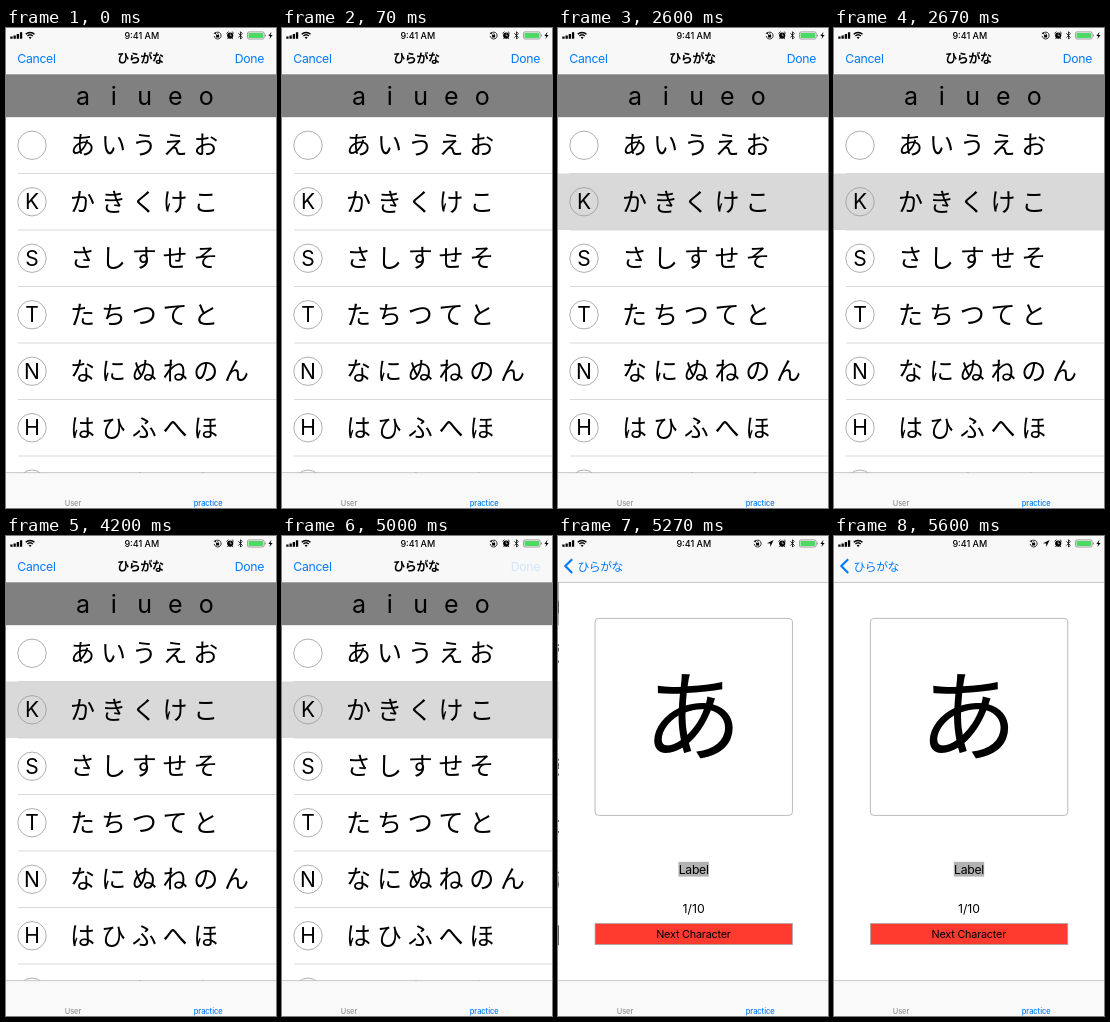
Write an HTML page that moves like this. It is 270x480 px and loops after 8 s.

```html
<!DOCTYPE html>
<html lang="ja">
<head>
<meta charset="utf-8">
<title>ひらがな</title>
<style>
html, body { margin: 0; width: 100%; height: 100%; overflow: hidden; background: #fff; }
svg { display: block; width: 100vw; height: 100vh; }
text { font-family: Inter, "Liberation Sans", sans-serif; fill: #000; }
.jp { font-family: "Noto Sans CJK JP", "Noto Sans CJK", sans-serif; font-weight: 350; }
.mid { text-anchor: middle; }
.ui { font-size: 12.24px; letter-spacing: -.3px; }
.blue { fill: #007aff; }
.kana { font-size: 25px; }
.line { fill: none; stroke: #000; stroke-width: .8; stroke-linecap: round; stroke-linejoin: round; }
</style>
</head>
<body>
<svg id="stage" viewBox="0 0 270 480">
  <rect width="270" height="480" fill="#fff"/>

  <g id="list">
    <rect y="46" width="270" height="43.2" fill="#808080"/>
    <g id="vowels"></g>
    <rect id="mark" width="270" height="56.5" fill="#d9d9d9"/>
    <g id="rows"></g>
  </g>

  <g id="card">
    <rect width="270" height="480" fill="#fff"/>
    <rect x="36.4" y="82.4" width="197.4" height="197" rx="3.5" fill="#fff" stroke="#aaa" stroke-width=".8"/>
    <text class="jp mid" x="134.2" y="217.4" font-size="98.5">あ</text>
    <rect x="119.8" y="325.8" width="30.4" height="14.8" fill="#b2b2b2"/>
    <text class="ui mid" x="135" y="337.7">Label</text>
    <text class="mid" x="135" y="377" font-size="12.24">1/10</text>
    <rect x="36.4" y="387.4" width="197.4" height="21.2" fill="#ff3b30" stroke="#aaa" stroke-width=".8"/>
    <text class="mid" x="134.8" y="402" font-size="10.8" letter-spacing="-.2">Next Character</text>
  </g>

  <rect width="270" height="46" fill="#f8f8f8"/>
  <rect y="46" width="270" height=".7" fill="#b2b2b2"/>
  <g id="listNav">
    <text class="ui blue" x="11.3" y="34.5">Cancel</text>
    <text class="jp mid" x="134.4" y="34.6" font-size="12" style="font-weight:600" letter-spacing="-.4">ひらがな</text>
    <text id="done" class="ui blue" x="228.8" y="34.5">Done</text>
  </g>
  <g id="cardNav">
    <path d="M14.2 23.2L7.3 30.1L14.2 37" fill="none" stroke="#007aff" stroke-width="2.1"/>
    <text class="jp blue" x="19.4" y="34.6" font-size="11.9" letter-spacing="-.5">ひらがな</text>
  </g>

  <rect y="444.8" width="270" height="35.2" fill="#f9f9f9"/>
  <rect y="444.4" width="270" height=".7" fill="#b2b2b2"/>
  <text class="mid" x="67" y="477.6" font-size="7.4" font-weight="500" style="fill:#929292">User</text>
  <text class="mid blue" x="202.2" y="477.6" font-size="7.4" font-weight="500">practice</text>

  <g id="status">
    <path d="M4.3 8.6h2.3v2.2h-2.3zM7.5 7.4h2.3v3.4h-2.3zM10.7 5.9h2.3v4.9h-2.3zM13.9 4.2h2.3v6.6h-2.3z"/>
    <path class="line" style="stroke-width:1.4;stroke-linecap:butt" d="M19.7 6.3a6.2 6.2 0 0 1 8.8 0M21.4 8.1a3.9 3.9 0 0 1 5.4 0"/>
    <path d="M22.7 9.4a2 2 0 0 1 2.8 0L24.1 10.9z"/>
    <text class="mid" x="135.8" y="10.6" font-size="9" font-weight="500">9:41 AM</text>
    <g id="lock">
      <path class="line" d="M-2.5 -2.4A3.5 3.5 0 1 1 -3.4 .8"/>
      <path d="M-4.1 -2.6l2.5 -.7l-.3 2.3zM-1.5 -.4h3v2.3h-3z"/>
      <path class="line" style="stroke-width:.6" d="M-.9 -.4v-.6a.9 .9 0 0 1 1.8 0v.6"/>
    </g>
    <path id="arrow" d="M215.6 4L209 7.3L212.1 7.6L212.4 10.8z"/>
    <circle cx="224.2" cy="7.6" r="3.1"/>
    <path class="line" d="M220.8 5.2l1.4 -1.3M227.6 5.2l-1.4 -1.3M222.3 10l-.7 .8M226.1 10l.7 .8"/>
    <path class="line" style="stroke:#fff;stroke-width:.6" d="M224.2 5.9v1.8h1.2"/>
    <path class="line" d="M232.6 5.5L236.3 9.3L234.5 11.1V3.7L236.3 5.5L232.6 9.3"/>
    <rect x="241.5" y="3.9" width="16.6" height="7.1" rx="1.5" fill="none" stroke="#777" stroke-width=".7"/>
    <rect x="242.5" y="4.9" width="14.6" height="5.1" rx=".7" fill="#4cd964"/>
    <path d="M258.9 6.2a1.3 1.3 0 0 1 0 2.5z" fill="#777"/>
    <path d="M265.5 3.8L262.4 7.9h1.9L263.4 11.1L266.6 6.9h-2z"/>
  </g>
</svg>
<script>
const LOOP = 8000, ROW = 56.5, TOP = 89, PITCH = 30.8;
const SELECT_A = 270, SELECT_KA = 2600, PRESS = 5000, PUSH = 5200, SETTLE = 400;
const $ = id => document.getElementById(id);

function add(parent, tag, attrs, label = '') {
  const el = document.createElementNS('http://www.w3.org/2000/svg', tag);
  for (const key in attrs) el.setAttribute(key, attrs[key]);
  el.textContent = label;
  parent.append(el);
}

function letters(parent, chars, x, y, cls) {
  [...chars].forEach((c, i) =>
    add(parent, 'text', { x: x + i * PITCH, y, class: cls }, c));
}

letters($('vowels'), 'aiueo', 77, 77, 'kana mid');

const rows = [
  ['', 'あいうえお'], ['K', 'かきくけこ'], ['S', 'さしすせそ'], ['T', 'たちつてと'],
  ['N', 'なにぬねのん'], ['H', 'はひふへほ'], ['M', 'まみむめも']
];
rows.forEach(([name, chars], i) => {
  const y = TOP + ROW * (i + .5), g = $('rows');
  add(g, 'circle', { cx: 26, cy: y, r: 14.2, fill: 'none', stroke: '#9a9a9a', 'stroke-width': .8 });
  add(g, 'text', { x: 26, y: y + 7.6, class: 'mid', 'font-size': 21 }, name);
  letters(g, chars, 76.6, y + 9.2, 'kana jp mid');
  add(g, 'rect', { x: 12, y: TOP + ROW * (i + 1) - .4, width: 258, height: .8, fill: '#d0d0d0' });
});

const show = (id, on) => $(id).setAttribute('display', on ? 'inline' : 'none');
const shift = (id, x, y = 0) => $(id).setAttribute('transform', `translate(${x} ${y})`);

function draw(t) {
  const pushed = t >= PUSH;
  const left = Math.max(0, 1 - (t - PUSH) / SETTLE);
  const slide = pushed ? .95 * left * left : 0;

  show('mark', t >= SELECT_A);
  $('mark').setAttribute('y', t < SELECT_KA ? TOP : TOP + ROW);
  $('done').setAttribute('opacity', t < PRESS ? 1 : .15);

  show('card', pushed);
  show('cardNav', pushed);
  show('listNav', !pushed);
  show('arrow', pushed);
  shift('lock', pushed ? 199.6 : 211.6, 7.5);
  shift('card', slide);
  shift('list', pushed ? -81 + slide * .3 : 0);
}

function tick(now) {
  draw(now % LOOP);
  requestAnimationFrame(tick);
}
draw(0);
requestAnimationFrame(tick);
</script>
</body>
</html>
```
